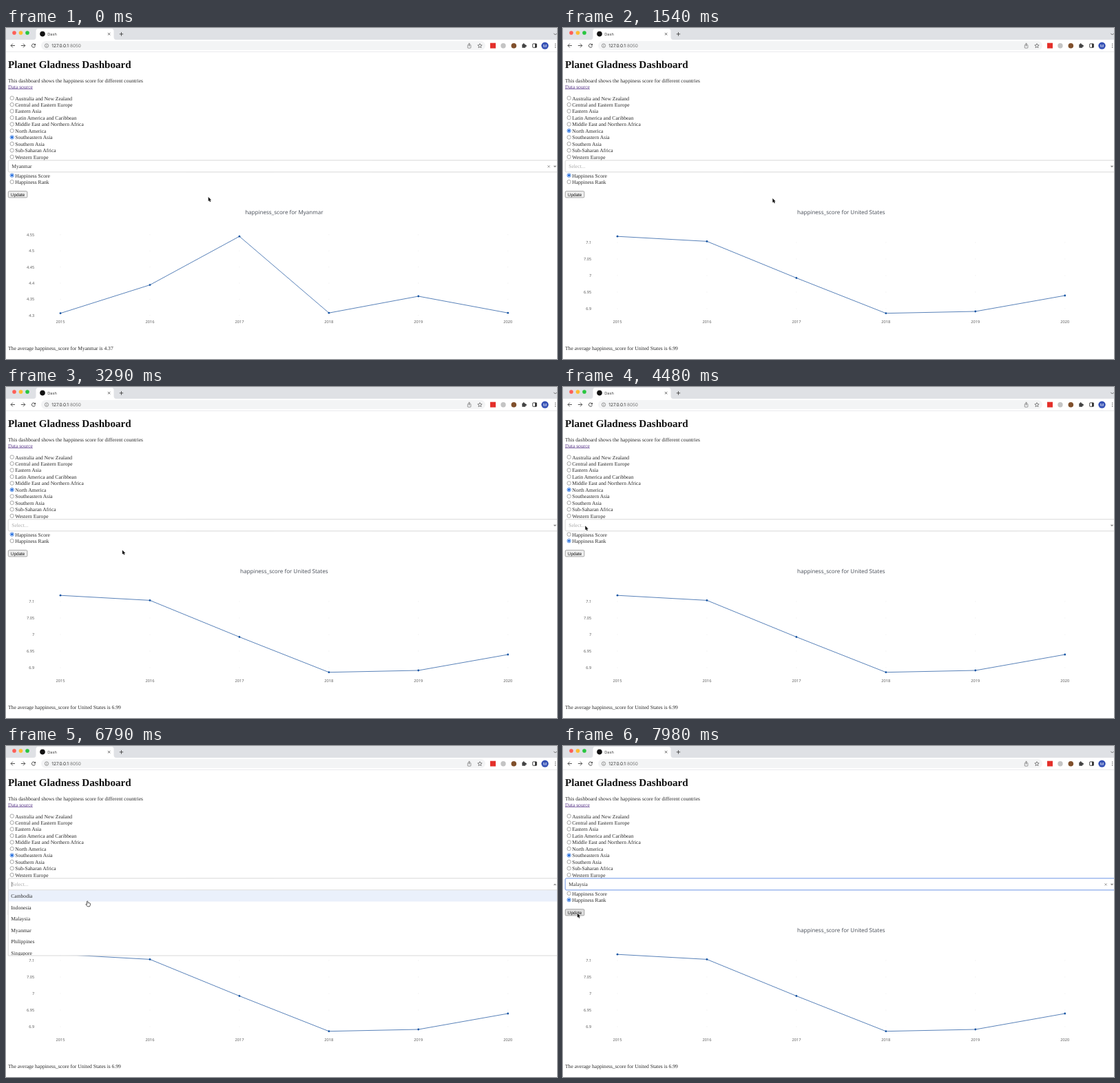
Recreate the animation shown at these times as an HTML page with a canvas. Size 800 by 480 pixels, loop 8000 ms.

```html
<!DOCTYPE html>
<html lang="en">
<head>
<meta charset="utf-8">
<title>Dashboard</title>
<style>
html, body { margin: 0; width: 100%; height: 100%; overflow: hidden; background: #fff; }
canvas { display: block; width: 800px; height: 480px; }
</style>
</head>
<body>
<canvas id="stage"></canvas>
<script>
const LOOP = 8000;
const SERIF = '"Liberation Serif", "Times New Roman", serif';
const SANS = '"Open Sans", sans-serif';
const UI = 'Inter, sans-serif';
const BODY = `7.57px ${SERIF}`;
const INK = '#2b2b2b';
const BLUE = '#1765dc';

// Times at which the page state changes
const RELOAD = 700, PICK_RANK = 4060, PICK_REGION = 5880;
const OPEN = 6480, CHOOSE = 7120, HOVER_UPDATE = 7560;

const regions = ['Australia and New Zealand', 'Central and Eastern Europe', 'Eastern Asia',
  'Latin America and Caribbean', 'Middle East and Northern Africa', 'North America',
  'Southeastern Asia', 'Southern Asia', 'Sub-Saharan Africa', 'Western Europe'];
const options = ['Cambodia', 'Indonesia', 'Malaysia', 'Myanmar', 'Philippines', 'Singapore'];
const years = [2015, 2016, 2017, 2018, 2019, 2020];

const charts = {
  before: { country: 'Myanmar', mean: 4.37, ticks: [4.3, 4.35, 4.4, 4.45, 4.5, 4.55],
    y0: 416.8, step: 23.4, points: [413.7, 372.6, 302.2, 413.2, 389, 413.2] },
  after: { country: 'United States', mean: 6.99, ticks: [6.9, 6.95, 7, 7.05, 7.1],
    y0: 407, step: 24, points: [302.2, 309.4, 362.5, 413.7, 411, 388] }
};

// Pointer tip: time, x, y
const path = [
  [0, 293.7, 245], [700, 293.7, 245], [1540, 304.3, 247], [2550, 304.3, 247],
  [3290, 169.8, 236.5], [3360, 106, 230], [3430, 58, 226], [3500, 24, 223], [3570, 10, 222.5],
  [4200, 9, 222.5], [4550, 38, 196], [5600, 50.8, 181.7], [5810, 9, 158], [6020, 9, 158],
  [6400, 125, 200], [6560, 125, 201], [6790, 118.3, 224.8], [6930, 109.3, 249.5],
  [7180, 109, 249.5], [7660, 22, 242], [7980, 20.8, 242.5], [8000, 20.8, 242.5]
];

const canvas = document.getElementById('stage');
const ctx = canvas.getContext('2d');
const dpr = window.devicePixelRatio || 1;
canvas.width = 800 * dpr;
canvas.height = 480 * dpr;
ctx.scale(dpr, dpr);
ctx.textRendering = 'geometricPrecision';

function text(str, x, y, font = BODY, color = INK, align = 'left') {
  ctx.font = font;
  ctx.fillStyle = color;
  ctx.textAlign = align;
  ctx.fillText(str, x, y);
}

function rect(x, y, w, h, color) {
  ctx.fillStyle = color;
  ctx.fillRect(x, y, w, h);
}

function box(x, y, w, h, r, fill, stroke, width = 0.8) {
  ctx.beginPath();
  ctx.roundRect(x, y, w, h, r);
  if (fill) { ctx.fillStyle = fill; ctx.fill(); }
  if (stroke) { ctx.strokeStyle = stroke; ctx.lineWidth = width; ctx.stroke(); }
}

function disc(x, y, r, fill, stroke, width = 0.7) {
  ctx.beginPath();
  ctx.arc(x, y, r, 0, Math.PI * 2);
  if (fill) { ctx.fillStyle = fill; ctx.fill(); }
  if (stroke) { ctx.strokeStyle = stroke; ctx.lineWidth = width; ctx.stroke(); }
}

function line(color, width, ...pts) {
  ctx.beginPath();
  for (let i = 0; i < pts.length; i += 2) ctx.lineTo(pts[i], pts[i + 1]);
  ctx.strokeStyle = color;
  ctx.lineWidth = width;
  ctx.stroke();
}

function poly(color, ...pts) {
  ctx.beginPath();
  for (let i = 0; i < pts.length; i += 2) ctx.lineTo(pts[i], pts[i + 1]);
  ctx.closePath();
  ctx.fillStyle = color;
  ctx.fill();
}

function cross(x, y, r, color, width = 0.8) {
  line(color, width, x - r, y - r, x + r, y + r);
  line(color, width, x - r, y + r, x + r, y - r);
}

function tabStrip() {
  rect(0, 0, 800, 17, '#dfe1e5');
  ['#fe5f57', '#febc2e', '#28c63f'].forEach((c, i) => disc(12 + i * 9.5, 7, 2.8, c));
  ctx.beginPath();
  ctx.moveTo(40, 17);
  ctx.quadraticCurveTo(43.5, 17, 43.5, 13);
  ctx.lineTo(43.5, 4.5);
  ctx.quadraticCurveTo(43.5, 1, 47, 1);
  ctx.lineTo(153, 1);
  ctx.quadraticCurveTo(156.5, 1, 156.5, 4.5);
  ctx.lineTo(156.5, 13);
  ctx.quadraticCurveTo(156.5, 17, 160, 17);
  ctx.fillStyle = '#fff';
  ctx.fill();
  disc(53, 8.6, 3.8, '#111');
  text('Dash', 60.3, 10.8, `5.6px ${UI}`, '#444');
  cross(149.6, 8.7, 1.7, '#444');
  line('#444', 0.9, 164.8, 8.8, 170.2, 8.8);
  line('#444', 0.9, 167.5, 6.1, 167.5, 11.5);
  line('#555', 0.9, 795.3, 7.8, 797.5, 10, 799.7, 7.8);
}

function toolbar() {
  rect(0, 17, 800, 17, '#fff');
  box(51, 19, 645, 13, 6.5, '#f3f4f5');
  const dark = '#444', grey = '#707070';
  line(dark, 0.9, 13, 25.5, 7, 25.5);
  line(dark, 0.9, 9.8, 22.7, 7, 25.5, 9.8, 28.3);
  line(dark, 0.9, 21.8, 25.5, 27.8, 25.5);
  line(dark, 0.9, 25, 22.7, 27.8, 25.5, 25, 28.3);
  ctx.beginPath();
  ctx.arc(40, 25.6, 2.6, 0.3, Math.PI * 1.75);
  ctx.strokeStyle = dark;
  ctx.lineWidth = 0.9;
  ctx.stroke();
  poly(dark, 43, 22.4, 43, 25.2, 40.2, 25.2);

  disc(59, 25.6, 2.7, null, grey);
  line(grey, 0.7, 59, 25.2, 59, 27.2);
  line(grey, 0.7, 59, 23.9, 59, 24.6);
  const font = `6.5px ${UI}`;
  text('127.0.0.1', 66.3, 28, font, '#333');
  text(':8050', 66.3 + ctx.measureText('127.0.0.1').width, 28, font, '#777');

  box(670.3, 24.5, 4.6, 4.6, 0.6, null, grey, 0.7);
  line(grey, 0.7, 672.6, 26.8, 672.6, 22);
  line(grey, 0.7, 671.2, 23.3, 672.6, 21.9, 674, 23.3);
  const star = [];
  for (let i = 0; i <= 10; i++) {
    const a = i * Math.PI / 5 - Math.PI / 2, r = i % 2 ? 1.5 : 3.3;
    star.push(688 + r * Math.cos(a), 25.9 + r * Math.sin(a));
  }
  line('#555', 0.7, ...star);

  rect(703, 21.7, 8, 7.8, '#e4302b');
  disc(722, 25.7, 3.7, '#c4c4c4');
  disc(737.3, 25.7, 3.8, '#80502c');
  box(749.3, 23.7, 5, 5, 0.6, '#444');
  disc(751.6, 23.4, 1.2, '#444');
  disc(754.7, 26, 1.2, '#444');
  box(764.7, 22.9, 5.6, 5.4, 0.5, null, '#333', 0.9);
  rect(768, 22.9, 2.4, 5.4, '#333');
  disc(782.5, 25.6, 5.2, '#3450b5');
  text('M', 782.5, 27.6, `5.6px ${UI}`, '#fff', 'center');
  [23.2, 25.6, 28].forEach(y => disc(797.6, y, 0.65, '#444'));
  rect(0, 34, 800, 0.7, '#e1e3e5');
}

function radio(label, y, on, hover) {
  disc(8.7, y, 2.7, '#fff', on ? BLUE : hover ? '#444' : '#858585');
  if (on) disc(8.7, y, 1.65, BLUE);
  text(label, 13.2, y + 2.9);
}

function chart({ country, mean, ticks, y0, step, points }) {
  const xAt = i => 79 + i * 129.95;
  const tickFont = `5.7px ${SANS}`;
  text(`happiness_score for ${country}`, 403.8, 270, `8.05px ${SANS}`, '#454b55', 'center');
  ticks.forEach((v, i) => {
    const y = y0 - i * step;
    text(String(v), 41.3, y + 2, tickFont, '#555', 'right');
    years.forEach((_, k) => rect(xAt(k) - 0.5, y - 0.5, 1, 1, '#ececec'));
  });
  years.forEach((v, i) => text(String(v), xAt(i), 428, tickFont, '#555', 'center'));
  line('#5982b9', 1, ...points.flatMap((y, i) => [xAt(i), y]));
  points.forEach((y, i) => disc(xAt(i), y, 1.4, '#1654a3'));
  text(`The average happiness_score for ${country} is ${mean}`, 3, 466.5);
}

function dropdown(value, open, focused) {
  const edge = focused ? '#6d95e6' : '#cfcfcf';
  box(3.2, 191.9, 810, 17, 1.8, '#fff', edge, focused ? 1 : 0.8);
  text(value || 'Select...', 8.2, 203, BODY, value ? '#333' : '#aaa');
  if (value) cross(788, 200.8, 1.6, '#888');
  if (open) {
    rect(8, 197, 0.6, 7, '#444');
    poly('#888', 794.7, 201.8, 799.3, 201.8, 797, 199.4);
  } else {
    poly('#888', 794.7, 199.8, 799.3, 199.8, 797, 202.2);
  }
}

function menu(pointerY) {
  const top = 208.9, row = 16.6;
  const active = Math.max(0, Math.floor((pointerY - top) / row));
  ctx.save();
  ctx.beginPath();
  ctx.rect(3, top, 797, 95);
  ctx.clip();
  rect(3, top, 797, 95, '#fff');
  options.forEach((name, i) => {
    const y = top + i * row;
    if (i === active) rect(3, y, 797, row, '#eaf0fb');
    text(name, 7.3, y + 11);
  });
  ctx.restore();
  line('#cfcfcf', 0.8, 3.2, top, 3.2, 304, 800, 304);
  line('#e3e3e3', 0.7, 3.2, top, 800, top);
}

function button(hover) {
  box(3.3, 236.7, 27.6, 9.2, 1.4, hover ? '#dedede' : '#efefef', '#858585', 0.7);
  text('Update', 17.1, 243.6, '6.4px "Liberation Sans", Arial, sans-serif', '#111', 'center');
}

function arrow(x, y) {
  ctx.save();
  ctx.translate(x, y);
  ctx.beginPath();
  [[0, 0], [0, 6.2], [1.4, 5], [2.4, 7.2], [3.5, 6.7], [2.6, 4.6], [4.4, 4.5]]
    .forEach(p => ctx.lineTo(...p));
  ctx.closePath();
  ctx.strokeStyle = '#fff';
  ctx.lineWidth = 1.1;
  ctx.stroke();
  ctx.fillStyle = '#111';
  ctx.fill();
  ctx.restore();
}

function hand(x, y) {
  ctx.save();
  ctx.translate(x, y);
  ctx.beginPath();
  [[-0.8, 0.4], [0, 0], [0.8, 0.5], [0.9, 2.4], [3.8, 3], [4.3, 3.8], [4, 6], [3.2, 7.8],
    [0, 7.8], [-2.3, 4.8], [-1.8, 4], [-0.6, 4.8]].forEach(p => ctx.lineTo(...p));
  ctx.closePath();
  ctx.fillStyle = '#fff';
  ctx.fill();
  ctx.strokeStyle = '#333';
  ctx.lineWidth = 0.8;
  ctx.stroke();
  ctx.restore();
}

function pointerAt(t) {
  const i = path.findIndex((p, k) => k > 0 && t <= p[0]);
  const [t0, x0, y0] = path[i - 1], [t1, x1, y1] = path[i];
  const u = (t - t0) / (t1 - t0);
  return [x0 + (x1 - x0) * u, y0 + (y1 - y0) * u];
}

function draw(t) {
  const [px, py] = pointerAt(t);
  const fresh = t >= RELOAD;
  const open = t >= OPEN && t < CHOOSE;
  const region = !fresh || t >= PICK_REGION ? 6 : 5;
  const rank = t >= PICK_RANK;
  const value = !fresh ? 'Myanmar' : t >= CHOOSE ? 'Malaysia' : '';
  const over = y => px < 13 && Math.abs(py - y) < 4;

  rect(0, 0, 800, 480, '#fff');
  tabStrip();
  toolbar();
  text('Planet Gladness Dashboard', 3, 58.2, `bold 15.1px ${SERIF}`, '#111');
  text('This dashboard shows the happiness score for different countries', 3, 79);
  text('Data source', 3, 87.6, BODY, '#5b3a8a');
  rect(3, 88.4, ctx.measureText('Data source').width, 0.6, '#5b3a8a');
  regions.forEach((name, i) => {
    const y = 101.6 + i * 9.48;
    radio(name, y, i === region, over(y));
  });
  radio('Happiness Score', 213.7, !rank, over(213.7));
  radio('Happiness Rank', 223.1, rank, over(223.1));
  button(t >= HOVER_UPDATE);
  chart(fresh ? charts.after : charts.before);
  dropdown(value, open, t >= CHOOSE);
  if (open) menu(py);
  if (open && py > 208.9) hand(px, py);
  else arrow(px, py);
}

const start = performance.now();
function tick() {
  draw((performance.now() - start) % LOOP);
  requestAnimationFrame(tick);
}
tick();
</script>
</body>
</html>
```
